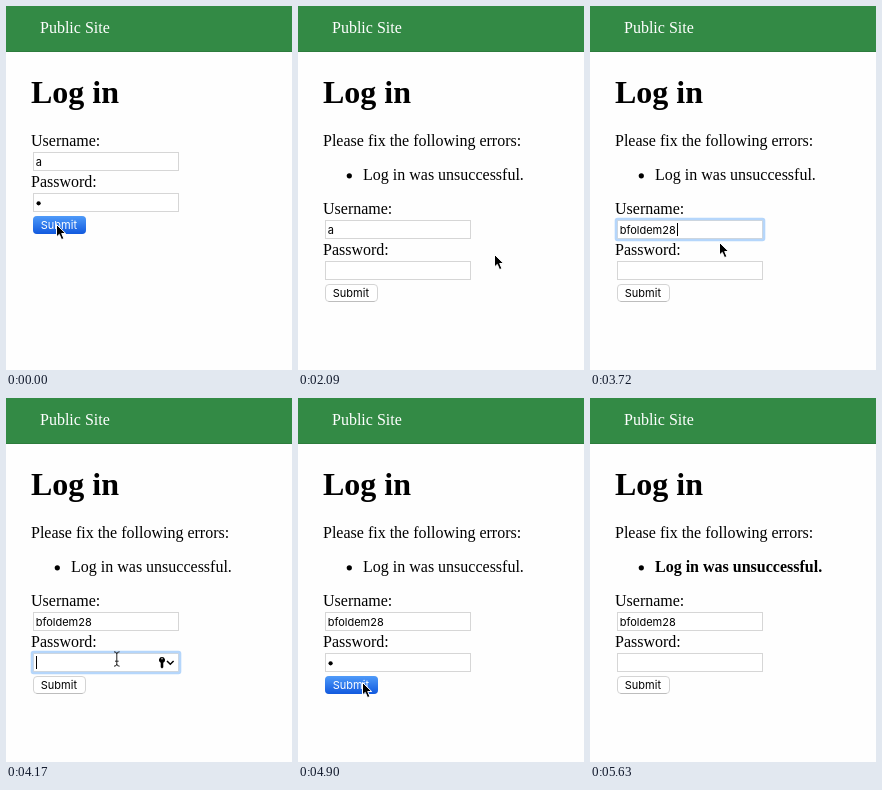
Animation of 286 by 364 pixels, one loop 7280 ms. Source, as an HTML page:

```html
<!DOCTYPE html>
<html lang="en">
<head>
<meta charset="utf-8">
<title>Log in</title>
<style>
html, body { margin: 0; width: 100%; height: 100%; overflow: hidden; background: #fefefe; }
svg { display: block; width: 286px; height: 364px; }
text { font: 16px "Liberation Serif", Times, serif; white-space: pre; }
.title { font-size: 32px; font-weight: bold; }
.ui { font: 11px Inter, Roboto, sans-serif; }
.field { fill: #fff; stroke: #d6d6d6; }
.ring { fill: none; stroke: #b5d6fb; stroke-width: 2.6; }

.form, .errors, .message, .old, .name, .dot, .pressed, .ring, .key, .caret, .arrow, .beam {
  animation: 7280ms step-end infinite;
}
.form { animation-name: form; }
.errors { animation-name: errors; }
.message { animation-name: message; }
.old { animation-name: old; }
.name { animation-name: name; }
.dot { animation-name: dot; }
.pressed { animation-name: pressed; }
.user.ring { animation-name: user-focus; }
.pass.ring, .key { animation-name: pass-focus; }
.user.caret { animation-name: user-caret; }
.pass.caret { animation-name: pass-caret; }
.arrow { animation-name: arrow; }
.beam { animation-name: beam; }

@keyframes form { 0% { transform: translateY(0); } 8.24%, 100% { transform: translateY(68px); } }
@keyframes errors { 0% { opacity: 0; } 8.24%, 100% { opacity: 1; } }
@keyframes message { 0% { font-weight: 400; } 77.33%, 100% { font-weight: 700; } }
@keyframes old { 0% { opacity: 1; } 42.99%, 100% { opacity: 0; } }
@keyframes name { 0% { opacity: 0; } 47.11%, 100% { opacity: 1; } }
@keyframes dot { 0%, 61.26% { opacity: 1; } 8.24%, 77.33%, 100% { opacity: 0; } }
@keyframes pressed { 0%, 67.3% { opacity: 1; } 8.24%, 77.33%, 100% { opacity: 0; } }
@keyframes user-focus { 0%, 57.28%, 100% { opacity: 0; } 34.75% { opacity: 1; } }
@keyframes pass-focus { 0%, 67.3%, 100% { opacity: 0; } 57.28% { opacity: 1; } }
@keyframes user-caret {
  0%, 55.21%, 100% { opacity: 0; transform: translate(30px, 149px); }
  34.75% { opacity: 1; transform: translate(36px, 149px); }
  42.99% { opacity: 1; transform: translate(30px, 149px); }
  47.11% { opacity: 1; transform: translate(87px, 149px); }
}
@keyframes pass-caret {
  0%, 67.3%, 100% { opacity: 0; transform: translate(30px, 190px); }
  57.28% { opacity: 1; transform: translate(30px, 190px); }
  61.26% { opacity: 1; transform: translate(37px, 190px); }
}
@keyframes arrow {
  0% { opacity: 1; transform: translate(49px, 217px); }
  8.24% { opacity: 1; transform: translate(89px, 210px); }
  10.16%, 32.82%, 55.21%, 75.41%, 100% { opacity: 0; transform: none; }
  28.7% { opacity: 1; transform: translate(195px, 247px); }
  30.76% { opacity: 1; transform: translate(174px, 225px); }
  51.09% { opacity: 1; transform: translate(128px, 235px); }
  53.15% { opacity: 1; transform: translate(117px, 244px); }
  63.32% { opacity: 1; transform: translate(76px, 273px); }
  65.24% { opacity: 1; transform: translate(66px, 281px); }
  67.3% { opacity: 1; transform: translate(63px, 283px); }
  71.42% { opacity: 1; transform: translate(70px, 281px); }
  73.35% { opacity: 1; transform: translate(101px, 276px); }
}
@keyframes beam {
  0%, 51.09%, 63.32%, 100% { opacity: 0; transform: none; }
  32.82% { opacity: 1; transform: translate(147px, 219px); }
  34.75% { opacity: 1; transform: translate(138px, 219px); }
  55.21% { opacity: 1; transform: translate(107px, 253px); }
  61.26% { opacity: 1; transform: translate(86px, 261px); }
}
</style>
</head>
<body>
<svg viewBox="0 0 286 364">
  <defs>
    <linearGradient id="blue" x2="0" y2="1">
      <stop stop-color="#4f9bf9"/>
      <stop offset="1" stop-color="#1159de"/>
    </linearGradient>
  </defs>

  <rect width="286" height="46" fill="#338a45"/>
  <rect y="45" width="286" height="1" fill="#2d7c3d"/>
  <text x="34" y="27" fill="#fff">Public Site</text>
  <text class="title" x="25" y="97">Log in</text>

  <g class="errors">
    <text x="25" y="140">Please fix the following errors:</text>
    <circle cx="51.3" cy="169.8" r="2.6"/>
    <text class="message" x="65" y="174">Log in was unsuccessful.</text>
  </g>

  <g class="form">
    <text x="25" y="140">Username:</text>
    <rect class="field" x="27.5" y="146.5" width="145" height="18"/>
    <rect class="user ring" x="26" y="145" width="148" height="21" rx="1.5"/>
    <text class="ui old" x="29.7" y="160">a</text>
    <text class="ui name" x="29.7" y="160">bfoldem28</text>
    <rect class="user caret" width="1" height="13"/>

    <text x="25" y="181">Password:</text>
    <rect class="field" x="27.5" y="187.5" width="145" height="18"/>
    <rect class="pass ring" x="26" y="186" width="148" height="21" rx="1.5"/>
    <circle class="dot" cx="32.6" cy="197.3" r="2.1"/>
    <rect class="pass caret" width="1" height="13"/>
    <g class="key">
      <path d="M156 191a3 3 0 0 1 1.3 5.7v4.6l-1.3 1.2-1.3-1.2v-4.6a3 3 0 0 1 1.3-5.7z"/>
      <circle cx="156" cy="192.8" r=".7" fill="#fff"/>
      <path d="M161 195l3.3 3.2 3.3-3.2" fill="none" stroke="#000" stroke-width="1.5"/>
    </g>

    <rect x="27.5" y="210.5" width="52" height="17" rx="3.5" fill="#fff" stroke="#d4d4d4"/>
    <path d="M30.5 227.5h46" stroke="#bdbdbd"/>
    <text class="ui" x="34.8" y="223">Submit</text>
    <g class="pressed">
      <rect x="27" y="210" width="53" height="18" rx="4" fill="url(#blue)"/>
      <text class="ui" x="34.8" y="223" fill="#fff">Submit</text>
    </g>
  </g>

  <path class="arrow" d="M1.5 1.5V14l2.8-2.6 2.2 5.2 2.4-1-2.2-5.1h4z" stroke="#fff" stroke-width="1"/>
  <path class="beam" d="M1 .8Q3.8 .8 3.8 3V13Q3.8 15.2 1 15.2M6.6 .8Q3.8 .8 3.8 3M3.8 13Q3.8 15.2 6.6 15.2M2 10.2H5.6" fill="none" stroke="#222"/>
</svg>
</body>
</html>
```
